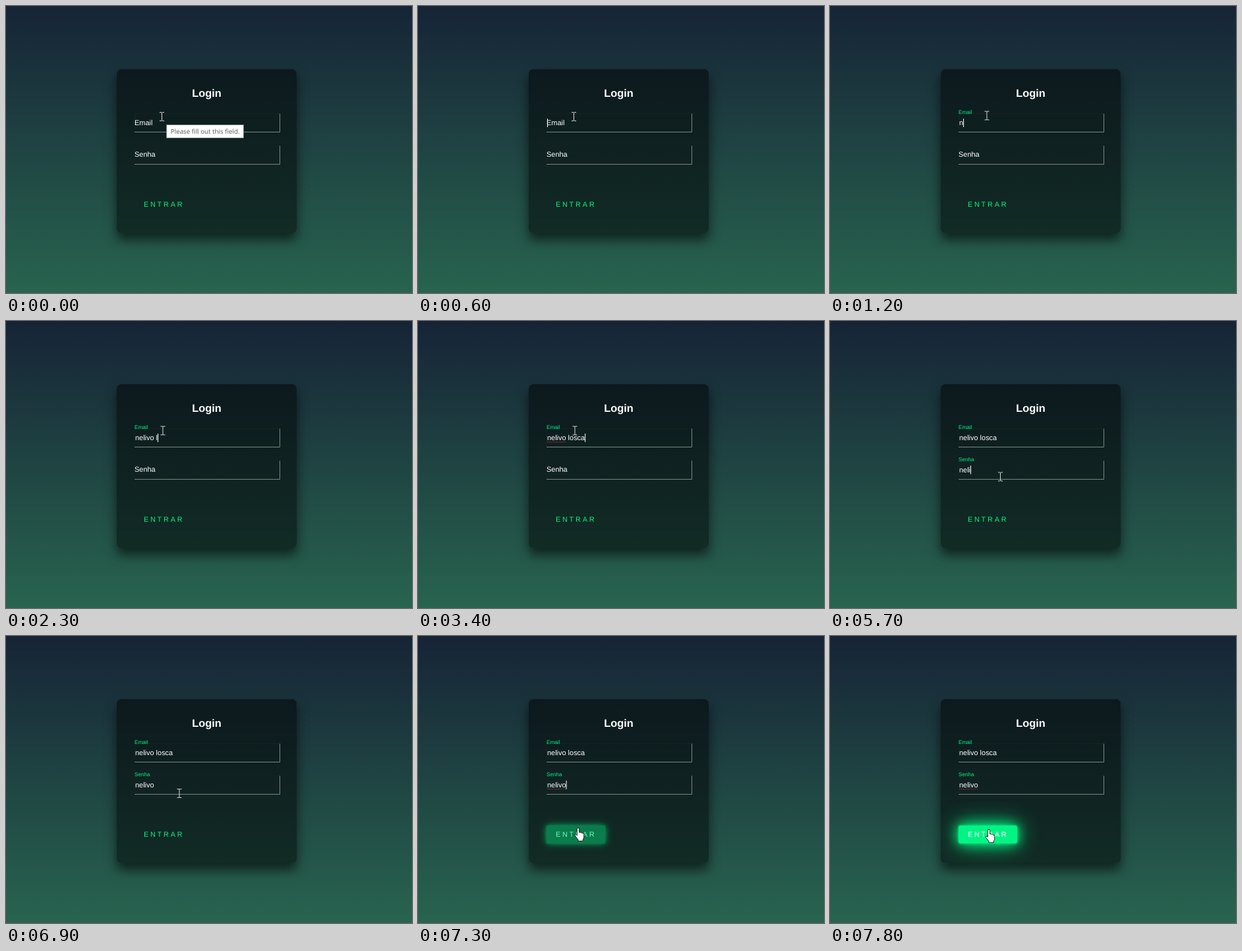
An HTML page for the animation above (8000 ms loop, 616x436 px).

```html
<!DOCTYPE html>
<html lang="pt">
<head>
<meta charset="utf-8">
<title>Login</title>
<style>
  html, body { margin: 0; width: 100%; height: 100%; overflow: hidden; }
  #stage {
    position: relative; width: 616px; height: 436px; overflow: hidden;
    background: linear-gradient(#162436, #28644f);
  }
  #card {
    position: absolute; left: 167.8px; top: 96.3px; width: 273.6px; height: 248.8px;
    border-radius: 6.84px; background: rgba(0, 0, 0, .5);
    box-shadow: 0 10.3px 17.1px rgba(0, 0, 0, .6);
  }
  #button { position: absolute; left: 195.2px; top: 288.2px; width: 89px; height: 26.6px; }
  svg { position: absolute; left: 0; top: 0; }
  text {
    font-family: "Liberation Sans", Arial, sans-serif; font-size: 10.94px; fill: #fff;
    text-rendering: geometricPrecision; white-space: pre;
  }
  .edge { fill: none; stroke: #788882; stroke-width: 1; }
  .shade { fill: none; stroke: #13241f; stroke-width: 1; }
  .spell { stroke: #c42430; stroke-width: 1.2; stroke-dasharray: 1.4 1.3; }
  .caret { fill: #fff; }
</style>
</head>
<body>
<div id="stage">
  <div id="card"></div>
  <div id="button"></div>
  <svg width="616" height="436" viewBox="0 0 616 436">
    <text x="304.6" y="138.3" text-anchor="middle" style="font-size:16.4px;font-weight:bold">Login</text>
    <g id="fields"></g>
    <text id="enter" x="208.9" y="305" letter-spacing="2.76">ENTRAR</text>
    <g id="tip">
      <rect x="243.5" y="180.5" width="117" height="20" fill="#fff" stroke="#5f6f70" stroke-width=".7"/>
      <text x="249.8" y="194" style="font-family:'Open Sans','Noto Sans',sans-serif;font-size:9.8px;fill:#575757">Please fill out this field.</text>
    </g>
    <g id="beam" fill="none" stroke="#d5dcda" stroke-width="1">
      <path d="M-3.5-6.5H-1L0-6L1-6.5H3.5M0-6V6M-3.5 6.5H-1L0 6L1 6.5H3.5"/>
    </g>
    <path id="arrow" d="M0 0V13L3 10.3L5 15L7.2 14L5.2 9.6H9.2Z" fill="#fff" stroke="#000" stroke-width=".8"/>
    <path id="hand" fill="#fff" stroke="#111" stroke-width=".9" stroke-linejoin="round"
      d="M-1.6 1Q-1.6-.6 0-.6T1.6 1V6.4Q3.2 5.4 4.2 7Q5.7 6.2 6.6 7.8Q8.7 7.2 8.7 9.6V13Q8.7 15.4 7.3 17V19.4H0V17.4L-4.4 11.8Q-5.4 10.2-4.1 9.6Q-3 9.3-1.6 11Z"/>
  </svg>
</div>
<script>
const LOOP = 8000, STEP = 100;
const GREEN = [3, 244, 132], WHITE = [255, 255, 255];
const NAME = "nelivo losca";
const $ = id => document.getElementById(id);

// typed: [time, number of characters]
const fields = [
  { label: "Email", top: 163.5, focus: 600, blur: 4500, spell: 2700, value: NAME,
    typed: [[600, 0], [1200, 1], [1700, 3], [2000, 6], [2100, 7], [2300, 8], [2700, 8],
            [3000, 9], [3300, 11], [3400, 12]] },
  { label: "Senha", top: 212.2, focus: 4500, blur: LOOP, spell: 7100, value: NAME.slice(0, 6),
    typed: [[4500, 0], [5100, 1], [5600, 3], [5700, 4], [5900, 5], [6200, 6]] }
];

// pointer: [time, x, y]
const path = [
  [600, 236.5, 168], [700, 238, 166.5], [3800, 238, 166.5], [4000, 244, 177], [4200, 258, 201],
  [4400, 262, 227], [4500, 262, 235], [4700, 258.5, 236.5], [6600, 258.5, 236.5],
  [6900, 263, 239], [7000, 262, 252], [7100, 255, 272], [7200, 247, 288],
  [7300, 243, 292], [7500, 241, 294.5]
];

const mix = (a, b, p) => a + (b - a) * p;
const rgb = (a, b, p) => `rgb(${a.map((v, i) => Math.round(mix(v, b[i], p)))})`;
const show = (el, on) => el.setAttribute("visibility", on ? "visible" : "hidden");

// CSS "ease" curve, cubic-bezier(.25, .1, .25, 1)
function ease(x) {
  if (x <= 0) return 0;
  if (x >= 1) return 1;
  const bez = (a, b, u) => 3 * a * u * (1 - u) ** 2 + 3 * b * u * u * (1 - u) + u ** 3;
  let lo = 0, hi = 1;
  for (let i = 0; i < 24; i++) {
    const mid = (lo + hi) / 2;
    if (bez(.25, .25, mid) < x) lo = mid; else hi = mid;
  }
  return bez(.1, 1, lo);
}

function add(parent, tag, attrs) {
  const el = document.createElementNS("http://www.w3.org/2000/svg", tag);
  for (const k in attrs) el.setAttribute(k, attrs[k]);
  return parent.appendChild(el);
}

for (const f of fields) {
  const g = $("fields"), y = f.top;
  add(g, "path", { class: "shade", d: `M195.5 ${y + 27.5}V${y}H415` });
  add(g, "path", { class: "edge", d: `M195 ${Math.round(y + 27.3) + .5}H415.5V${y}` });
  f.line = add(g, "line", { class: "spell", x1: 196, x2: 224, y1: y + 20.3, y2: y + 20.3 });
  f.text = add(g, "text", { x: 196, y: y + 17.9 });
  f.caret = add(g, "rect", { class: "caret", y: y + 7.5, width: 1, height: 13 });
  f.tag = add(g, "text", { x: 195 });
  f.tag.textContent = f.label;
}

function drawField(f, t) {
  const p = ease((t - f.focus) / 500);
  f.tag.setAttribute("y", mix(f.top + 17, f.top + .8, p));
  f.tag.style.fontSize = mix(10.94, 8.2, p) + "px";
  f.tag.style.fill = rgb(WHITE, GREEN, p);

  const last = f.typed.filter(k => k[0] <= t).pop() || [0, 0];
  const str = f.value.slice(0, last[1]);
  if (f.text.textContent !== str) f.text.textContent = str;
  const focused = t >= f.focus && t < f.blur;
  f.caret.setAttribute("x", 196 + (str ? f.text.getComputedTextLength() : 0));
  show(f.caret, focused && (t - last[0]) % 1000 < 500);
  show(f.line, focused && t >= f.spell);
}

function pointerAt(t) {
  if (t <= path[0][0]) return path[0].slice(1);
  const i = path.findIndex(k => k[0] > t);
  if (i < 0) return path[path.length - 1].slice(1);
  const a = path[i - 1], b = path[i], p = (t - a[0]) / (b[0] - a[0]);
  return [mix(a[1], b[1], p), mix(a[2], b[2], p)];
}

function drawPointer(t) {
  const [x, y] = pointerAt(t);
  const inField = (y > 160 && y < 192) || (y > 212 && y < 241);
  const kind = y > 287 ? "hand" : inField ? "beam" : "arrow";
  for (const id of ["hand", "beam", "arrow"]) {
    show($(id), id === kind);
    $(id).setAttribute("transform", `translate(${x} ${y})`);
  }
}

function drawButton(t) {
  const p = ease((t - 7175) / 500), s = $("button").style;
  const color = `rgba(${GREEN},${p})`;
  s.background = color;
  s.borderRadius = 3.42 * p + "px";
  s.boxShadow = [3.42, 17.1, 34.2].map(r => `0 0 ${r * p}px ${color}`).join(",");
  $("enter").style.fill = rgb(GREEN, WHITE, p);
}

function draw(t) {
  show($("tip"), t < 600);
  for (const f of fields) drawField(f, t);
  drawButton(t);
  drawPointer(t);
}

let start = null;
function tick(now) {
  if (start === null) start = now;
  draw(Math.floor((now - start) % LOOP / STEP) * STEP);
  requestAnimationFrame(tick);
}
draw(0);
requestAnimationFrame(tick);
</script>
</body>
</html>
```
